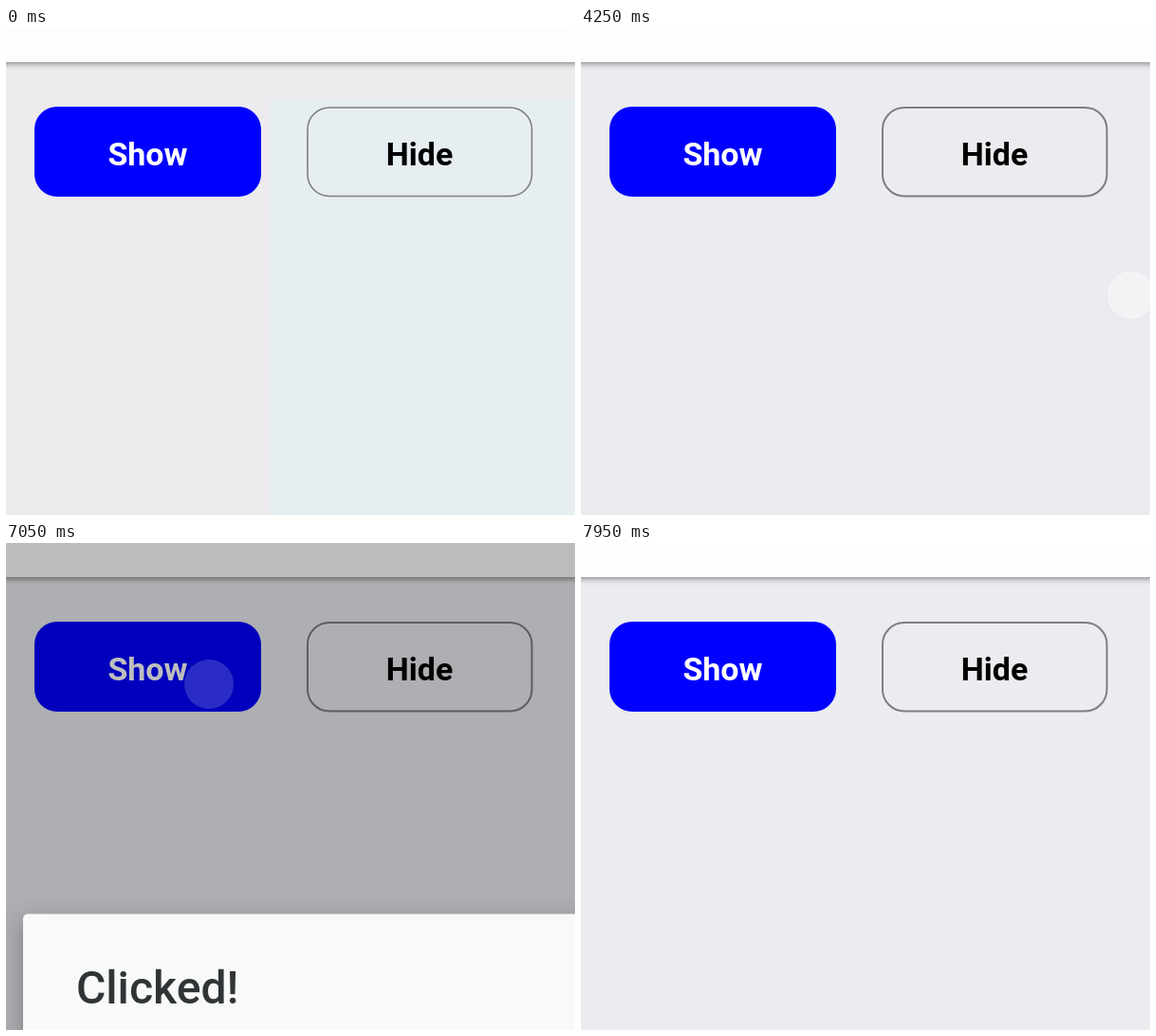
Write an HTML page with a canvas that moves like this. It is 600 by 514 pixels and loops after 8000 ms.

```html
<!DOCTYPE html>
<html lang="en">
<head>
<meta charset="utf-8">
<style>
  html, body { margin: 0; width: 100%; height: 100%; overflow: hidden; }
  canvas { display: block; }
</style>
</head>
<body>
<canvas width="600" height="514"></canvas>
<script>
const LOOP = 8000, STEP = 50;
const ctx = document.querySelector('canvas').getContext('2d');

const ramp = (t, from, to) => Math.min(1, Math.max(0, (t - from) / (to - from)));
const mix = (a, b, k) => a + (b - a) * k;
const blend = (a, b, k) => `rgb(${a.map((v, i) => Math.round(mix(v, b[i], k)))})`;

function rect(x, y, w, h, color) {
  ctx.fillStyle = color;
  ctx.fillRect(x, y, w, h);
}

function rounded(x, y, w, h, r) {
  ctx.beginPath();
  ctx.roundRect(x, y, w, h, r);
}

function label(text, x, y, font, color, align = 'center') {
  ctx.font = `${font} Roboto, sans-serif`;
  ctx.textAlign = align;
  ctx.fillStyle = color;
  ctx.fillText(text, x, y);
}

function shadow(color, blur, dy) {
  ctx.shadowColor = color;
  ctx.shadowBlur = blur;
  ctx.shadowOffsetY = dy;
}

function drawScreen(t) {
  const k = ramp(t, 3000, 3800);
  const tintX = t < 2650 ? 278 : 266;
  rect(0, 0, 600, 514, blend([236, 235, 237], [235, 236, 240], k));
  rect(tintX, 75, 600, 439, blend([231, 238, 242], [235, 236, 240], k));

  ctx.save();
  shadow('rgba(0,0,0,.42)', 6, 2);
  rect(-20, -20, 640, 56, blend([253, 252, 255], [253, 255, 252], k));
  ctx.restore();

  rounded(30, 83, 239, 95, 24);
  ctx.fillStyle = '#00f';
  ctx.fill();
  label('Show', 149.5, 144.5, 'bold 34px', '#fff');

  rounded(318, 84, 236.5, 93.5, 23);
  ctx.lineWidth = mix(1.6, 2, k);
  ctx.strokeStyle = '#7e7e82';
  ctx.stroke();
  label('Hide', 436, 144.5, 'bold 34px', '#000');
}

function drawDialog(dim, alpha) {
  rect(0, 0, 600, 514, `rgba(0,0,0,${dim})`);
  if (!alpha) return;
  ctx.save();
  ctx.globalAlpha = alpha;
  shadow('rgba(0,0,0,.3)', 26, 8);
  rounded(18, 391.5, 640, 300, 5);
  ctx.fillStyle = '#f8faf9';
  ctx.fill();
  shadow('transparent', 0, 0);
  label('Clicked!', 74, 486, '500 48px', '#313436', 'left');
  ctx.restore();
}

function drawTouch(x, y, alpha) {
  if (alpha <= 0) return;
  ctx.beginPath();
  ctx.arc(x, y, 26, 0, 7);
  ctx.fillStyle = `rgba(255,255,255,${alpha})`;
  ctx.fill();
  ctx.lineWidth = 1.5;
  ctx.strokeStyle = `rgba(120,120,130,${alpha * 0.15})`;
  ctx.stroke();
}

function draw(t) {
  drawScreen(t);

  if (t >= 6800 && t < 7950) {
    const out = ramp(t, 7735, 7950);
    drawDialog(0.6 * ramp(t, 6750, 7450) * (1 - out),
               ramp(t, 6750, 7000) * (1 - ramp(t, 7690, 7930)));
  }

  if (t >= 3000 && t < 4900) {
    const k = ramp(t, 3000, 4250) ** 1.55;
    drawTouch(mix(473, 580, k), mix(152, 282, k), mix(0.72, 0.33, k));
  } else if (t >= 5100 && t < 6600) {
    const k = ramp(t, 5100, 6350) ** 1.3;
    drawTouch(mix(214, 315, k), mix(148, 227, k), 0.5 * (1 - ramp(t, 5700, 6500)));
  } else if (t >= 6650) {
    drawTouch(214, 149, 0.45 * (1 - ramp(t, 6800, 7200)));
  }
}

function frame() {
  const t = performance.now() % LOOP;
  draw(Math.floor(t / STEP) * STEP);
  requestAnimationFrame(frame);
}
frame();
</script>
</body>
</html>
```
